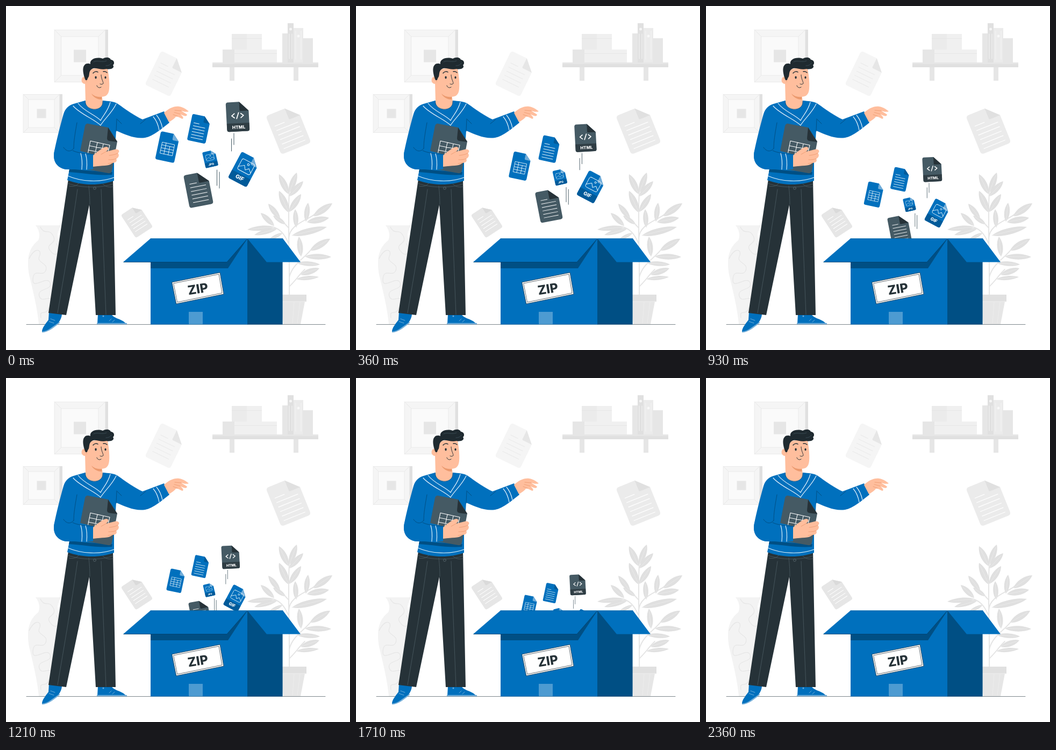
Animation of 640x640 px, one loop 2.43 s. Source, as an HTML page with a canvas:

```html
<!DOCTYPE html>
<html lang="en">
<head>
<meta charset="utf-8">
<title>Files dropping into a ZIP box</title>
<style>
  html, body { margin: 0; width: 100%; height: 100%; overflow: hidden; background: #fff; }
  canvas { display: block; width: 640px; height: 640px; }
</style>
</head>
<body>
<canvas id="stage" width="640" height="640"></canvas>
<script>
const g = document.getElementById('stage').getContext('2d');
const BLUE = '#0070bd', NAVY = '#004f84', INK = '#263238', SLATE = '#455a64';
const SKIN = '#ffbe9d', SKIN_LINE = '#eb996e', PALE = '#72add9', WHITE = '#fff';

const fill = (d, color) => { g.fillStyle = color; g.fill(new Path2D(d)); };
const line = (d, color, width = 1) => {
  g.strokeStyle = color;
  g.lineWidth = width;
  g.stroke(new Path2D(d));
};
const rect = (x, y, w, h, color) => { g.fillStyle = color; g.fillRect(x, y, w, h); };
const oval = (x, y, rx, ry, color) => {
  g.fillStyle = color;
  g.beginPath();
  g.ellipse(x, y, rx, ry, 0, 0, Math.PI * 2);
  g.fill();
};
const label = (text, x, y, size, color = WHITE) => {
  g.font = `800 ${size}px Inter, "Open Sans", sans-serif`;
  g.textAlign = 'center';
  g.textBaseline = 'alphabetic';
  g.fillStyle = color;
  g.fillText(text, x, y);
};
const at = (x, y, deg, draw) => {
  g.save();
  g.translate(x, y);
  g.rotate(deg * Math.PI / 180);
  draw();
  g.restore();
};

// Sheet with a cut, folded top right corner; details use centred coordinates.
function sheet(x, y, deg, w, h, cut, color, fold, details, band) {
  at(x, y, deg, () => {
    const r = w / 2, b = h / 2, k = w * .1;
    const shape = `M${k - r} ${-b}H${r - cut}L${r} ${cut - b}V${b - k}Q${r} ${b} ${r - k} ${b}` +
      `H${k - r}Q${-r} ${b} ${-r} ${b - k}V${k - b}Q${-r} ${-b} ${k - r} ${-b}Z`;
    fill(shape, color);
    if (band) {
      g.save();
      g.clip(new Path2D(shape));
      rect(-r, band[0], w, h, band[1]);
      g.restore();
    }
    fill(`M${r - cut} ${-b}V${cut - b - 2}Q${r - cut} ${cut - b} ${r - cut + 2} ${cut - b}H${r}Z`, fold);
    details();
  });
}

function rows(x, y, w, gap, n, color, width) {
  for (let i = 0; i < n; i++) line(`M${x} ${y + i * gap}h${i ? w : w * .45}`, color, width);
}

function frame(x, y, w, h, pad, hole) {
  rect(x + w, y, 5, h, '#e0e0e0');
  rect(x, y, w, h, '#f5f5f5');
  line(`M${x + .5} ${y + .5}h${w - 1}v${h - 1}h${1 - w}z`, '#ebebeb');
  const r = x + w, b = y + h;
  line(`M${x} ${y}l${pad} ${pad}M${r} ${y}l${-pad} ${pad}M${x} ${b}l${pad} ${-pad}M${r} ${b}l${-pad} ${-pad}`, '#e8e8e8');
  rect(x + pad, y + pad, w - 2 * pad, h - 2 * pad, '#fafafa');
  line(`M${x + pad} ${y + pad}h${w - 2 * pad}v${h - 2 * pad}h${2 * pad - w}z`, '#ebebeb');
  rect(x + (w - hole) / 2, y + (h - hole) / 2, hole, hole, '#e6e6e6');
}

function shelf() {
  rect(416, 113, 9, 26, '#e6e6e6');
  rect(535, 113, 9, 26, '#e6e6e6');
  rect(384, 105, 197, 9, '#e0e0e0');
  rect(384, 105, 197, 3, '#e6e6e6');
  rect(420, 52, 56, 29, '#f0f0f0');
  rect(420, 52, 28, 29, '#ebebeb');
  rect(420, 60, 56, 1, '#e6e6e6');
  rect(403, 81, 101, 24, '#f0f0f0');
  rect(403, 81, 22, 24, '#e6e6e6');
  rect(425, 88, 79, 1, '#e6e6e6');
  rect(514, 51, 11, 54, '#e6e6e6');
  rect(524, 32, 11, 73, '#e0e0e0');
  rect(535, 41, 18, 64, '#ebebeb');
  rect(552, 60, 19, 45, '#e6e6e6');
  oval(529.5, 43, 2.5, 2.5, '#f5f5f5');
  line('M527 52v46M532 52v46M539 47v52M549 47v52', '#f5f5f5');
  oval(544, 56, 2.5, 2.5, '#f8f8f8');
}

function leaf([x, y, tx, ty, bulge = .19]) {
  const dx = tx - x, dy = ty - y, nx = -dy * bulge, ny = dx * bulge;
  const side = s => `C${x + dx * .25 + s * nx} ${y + dy * .25 + s * ny} ` +
    `${x + dx * .72 + s * nx} ${y + dy * .72 + s * ny} `;
  fill(`M${x} ${y}${side(1)}${tx} ${ty}M${x} ${y}${side(-1)}${tx} ${ty}`, '#e0e0e0');
  line(`M${x} ${y}L${x + dx * .85} ${y + dy * .85}`, '#ededed', .7);
}

function plant() {
  line('M527 540C528 470 524 400 527 345M526 432C528 405 560 400 576 386M525 440C518 425 510 412 490 410' +
    'M525 412C518 404 512 398 504 390M527 505C532 480 558 468 570 450M527 522C538 512 545 500 556 490', '#e3e3e3', 1.8);
  [
    [526, 350, 508, 313], [527, 347, 541, 310], [527, 354, 553, 326],
    [526, 384, 508, 344], [527, 383, 549, 350],
    [510, 396, 488, 368], [520, 406, 497, 390], [558, 401, 562, 366],
    [572, 391, 607, 367], [560, 402, 601, 394], [540, 412, 538, 378],
    [499, 411, 449, 416, .12], [505, 414, 462, 426, .13], [499, 409, 474, 385],
    [515, 422, 489, 435, .14], [532, 427, 597, 411, .12],
    [549, 466, 545, 429], [566, 455, 603, 433], [556, 466, 605, 467, .14],
    [541, 478, 584, 481, .13], [548, 500, 583, 488], [540, 508, 582, 504, .12]
  ].forEach(leaf);
  fill('M506 537H559V550H506Z', '#e0e0e0');
  fill('M510 550H556L548 592H516Z', '#e6e6e6');
  line('M507 550H558', '#f0f0f0', 1);
  line('M536 551L533 590M547 551L542 590', '#ededed');
}

function vase() {
  fill('M55 408H103C96 418 94 428 98 436C112 450 118 470 113 500C108 530 100 560 97 592H61C58 560 50 530 43 500C38 470 42 450 60 436C64 428 62 416 55 408Z', '#f3f3f3');
  line('M64 411C72 428 80 412 88 428S72 441 82 455S103 461 94 442M43 470C55 446 68 454 62 466S80 478 74 492' +
    'S52 486 50 508S77 500 82 515S57 524 62 540S89 530 82 556S62 560 65 580', '#e6e6e6', 1.2);
}

function room() {
  frame(90, 44, 95, 98, 13, 23);
  frame(32, 164, 68, 72, 10, 17);
  shelf();
  sheet(297, 126, 26, 52, 70, 20, '#f5f5f5', '#e6e6e6', () => rows(-17, -14, 33, 8.5, 5, '#e9e9e9', 1));
  sheet(525.5, 229.5, -22, 60, 77, 22, '#ebebeb', '#e0e0e0', () => rows(-21, -15, 42, 9, 6, WHITE, 1.2));
  sheet(243.5, 400, -33, 38, 51, 13, '#e6e6e6', '#dadada', () => rows(-13, -11, 26, 6.5, 5, WHITE, 1));
  vase();
  plant();
  line('M38 592.5H594', '#6f7a7f', .9);
}

function photo(w, h) {
  const x = w / 2, y = h / 2, r = w * .12;
  line(`M${r - x} ${-y}H${x - r}Q${x} ${-y} ${x} ${r - y}V${y - r}Q${x} ${y} ${x - r} ${y}H${r - x}Q${-x} ${y} ${-x} ${y - r}V${r - y}Q${-x} ${-y} ${r - x} ${-y}Z` +
    `M${-x} ${y * .55}L${-x * .3} ${-y * .1}L${x * .1} ${y * .55}L${x * .5} ${y * .05}L${x} ${y * .6}`, WHITE, w * .035);
  g.beginPath();
  g.arc(x * .15, -y * .5, w * .07, 0, Math.PI * 2);
  g.stroke();
}

function files() {
  sheet(300.5, 262.5, 12, 36, 53, 12, BLUE, PALE, () =>
    line('M-11 -7H12V14H-11ZM-11 -2H12M-11 3.5H12M-11 8.5H12M-4 -7V14M4 -2V14', WHITE, .8));
  sheet(359, 228.5, 12, 35, 50, 12, BLUE, '#005a99', () => rows(-11.5, -9, 22, 5.5, 6, WHITE, .9));
  sheet(431, 206, -3, 42, 55, 17, SLATE, INK, () => {
    line('M-6 -6L-11 -2L-6 2M6 -6L11 -2L6 2M2 -7.5L-2 3.5', WHITE, 1.8);
    label('HTML', 1, 22.5, 8.4);
  }, [12, '#2f3d44']);
  sheet(443, 304, 28, 39, 55, 14, BLUE, PALE, () => {
    at(1, -6, 0, () => photo(26, 22));
    label('GIF', 0, 21, 10);
  }, [11, '#005a99']);
  sheet(380, 284.5, -13, 24, 30, 8, BLUE, PALE, () => {
    at(0, -3, 0, () => photo(15, 11));
    label('JPG', -.5, 12, 5.4);
  }, [6, '#005a99']);
  sheet(358, 341.5, -11, 45, 62, 19, SLATE, INK, () => rows(-14, -13, 29, 7, 6, WHITE, 1));
  line('M419.5 247V270M424 237V258M392.5 305V334M397 309V339', SLATE, 1);
}

function box() {
  rect(269, 433, 181, 159.5, BLUE);
  fill('M449 433H514.6V592.5H449Z', NAVY);
  fill('M269 476H411L449 433L413 488H269Z', NAVY);
  fill('M269 432.6H449L411 476.5H218Z', BLUE);
  line('M219 476.5H411L448 434', '#003f69', .8);
  fill('M449 432.6H515L548 476.5H485Z', BLUE);
  line('M269 433H515', '#00609f', .7);
  rect(340, 569, 26, 23, '#4d9bd1');
  fill('M309 514L398 496L405 536L317 554Z', WHITE);
  line('M309 514L398 496L405 536L317 554Z', INK, .7);
  line('M312 516L396 499L402 534L319 551Z', INK, .7);
  at(357, 526, -9, () => label('ZIP', 0, 8.6, 23.5, INK));
}

function legs() {
  fill('M80 569L104 572C104 580 100 586 97 590L74 606L67 606C67 599 73 592 79 584Z', BLUE);
  line('M68 606.5C78 606 88 598 99 589', PALE, 2);
  line('M80 587L89 590M83 582L91 585', PALE, 1);
  fill('M171 573H196C200 582 217 582 223 591H170Z', BLUE);
  line('M170 591H224', PALE, 2.4);
  oval(181, 577, 1.5, 1.5, PALE);
  line('M196 582L192 586M202 584L198 588', PALE, 1);
  fill('M116 322C140 330 175 331 199 323L204 575H167L155 370L112 575L79 571Z', INK);
  line('M133 341C122 420 108 500 96 571M177 341C180 420 183 500 186 574M156 369C156 354 155 345 154 335' +
    'M117 335C126 337 133 334 135 330M180 331C184 336 192 338 199 336M115 330C140 339 178 339 199 331', '#52636b', .7);
  g.strokeStyle = '#65747b';
  g.beginPath();
  g.arc(165, 339, 2.4, 0, Math.PI * 2);
  g.stroke();
}

function head() {
  fill('M147 142L148 179C149 197 181 197 180 178L178 164Z', SKIN);
  fill('M159 163C164 168 171 170 178 169V174C169 174 162 169 159 163Z', SKIN_LINE);
  fill('M150 118L188 114C191 124 193 142 192 154C191 166 185 169 177 169C164 169 152 160 150 146Z', SKIN);
  oval(147, 138, 6.5, 7, SKIN);
  line('M144 135C148 134 150 138 150 141', SKIN_LINE, .8);
  fill('M148 138C144 129 141 115 146 110C149 106 154 107 157 108C155 99 168 94 180 98C187 94 194 96 195 100C201 100 203 107 199 110C203 115 195 119 187 117C176 120 166 113 160 117C153 121 156 130 153 133C151 135 152 138 150 138Z', '#1f2a30');
  line('M163 104C171 100 177 106 187 102M186 111C191 111 195 109 196 106', SLATE, .7);
  oval(167, 133, 1.7, 2.4, INK);
  oval(185, 133, 1.6, 2.3, INK);
  line('M162 125C164 122 168 121 171 123M181 122C184 121 186 122 188 124', INK, 1.5);
  line('M177 128C177 135 181 141 181 144C180 146 177 146 175 145M169 148C170 152 174 153 177 151', INK, 1);
}

function person() {
  legs();
  fill('M147 176L126 182C116 185 110 191 107 201C100 226 94 250 90 270C86 288 94 301 112 304H118L114 324C140 334 175 335 201 325L201 290L205 232C222 239 240 248 259 245C274 242 290 228 304 217L294 196L254 211C240 205 222 192 208 182C200 177 190 177 180 176Z', BLUE);
  head();
  line('M147 178C149 197 181 197 180 178', NAVY, .8);
  line('M125 186C138 201 165 211 176 222C183 210 197 199 205 182M134 181C145 196 167 203 176 213C181 203 190 195 194 179', '#e2effa', 1.2);
  line('M274 206C280 213 283 220 285 231M280 203C286 210 289 217 291 227', '#e2effa', 1.2);
  line('M206 210L205 233M207 211L215 219M260 211L250 219', NAVY, 1);
  fill('M118 303C145 306 175 308 198 309L197 314C168 316 140 310 117 309Z', NAVY);
  line('M115 316C140 327 175 329 201 319', '#e2effa', 1.2);

  fill('M153 219L190 226L207 252L197 306Q196 312 190 311L139 302Q133 301 133 296L147 223Q149 218 153 219Z', SLATE);
  fill('M190 226L188 246Q188 250 192 251L207 253Z', INK);
  line('M157 251L193 259L187 283L152 276ZM155 260L191 267M153 268L189 275M170 254L165 278M181 257L176 280', WHITE, 1.1);

  fill('M128 222C127 243 126 256 126 267L163 276L162 304L112 304C95 302 86 287 90 270L104 220Z', BLUE);
  line('M132 217C128 240 126 252 126 265M126 265C119 273 112 270 107 263M124 269C132 273 146 275 162 276', NAVY, 1);
  line('M139 274C142 284 142 294 141 304M148 275C151 285 151 294 150 304', '#e2effa', 1.2);

  fill('M162 278C171 271 180 262 187 262C193 263 190 268 186 271L202 267C210 265 213 271 208 274C212 277 209 283 205 284C208 289 203 292 198 292C191 299 179 296 162 299Z', SKIN);
  line('M186 271L177 276M208 274C202 277 198 277 192 278M205 284C200 286 196 286 191 286M198 292L190 293', SKIN_LINE, .8);
  fill('M294 199C302 191 312 186 322 187C330 188 336 193 340 196C335 198 330 196 326 195L337 202C336 207 329 204 324 201C330 206 331 209 328 210C323 208 320 205 316 206C312 211 308 213 303 216Z', SKIN);
  line('M326 195L314 194M324 201L313 198M319 205L311 202', SKIN_LINE, .8);
}

const LOOP = 2430, STEP = LOOP / 34;

// The whole pile shrinks towards x = 371 while it drops at a constant rate.
function render(step) {
  const p = step + Math.min(step, .35), scale = 1 - .0127 * p;
  g.clearRect(0, 0, 640, 640);
  rect(0, 0, 640, 640, WHITE);
  room();
  if (step < 33) {
    g.save();
    g.beginPath();
    g.rect(0, 0, 640, 434);
    g.clip();
    g.translate(371 * (1 - scale), 9.95 * p);
    g.scale(scale, scale);
    files();
    g.restore();
  }
  box();
  person();
}

g.lineCap = g.lineJoin = 'round';
const start = performance.now();
let shown = -1;
function tick() {
  const t = Math.max(0, performance.now() - start) % LOOP;
  const step = Math.min(33, Math.floor((t + 6) / STEP));
  if (step !== shown) render(shown = step);
  requestAnimationFrame(tick);
}
tick();
</script>
</body>
</html>
```
